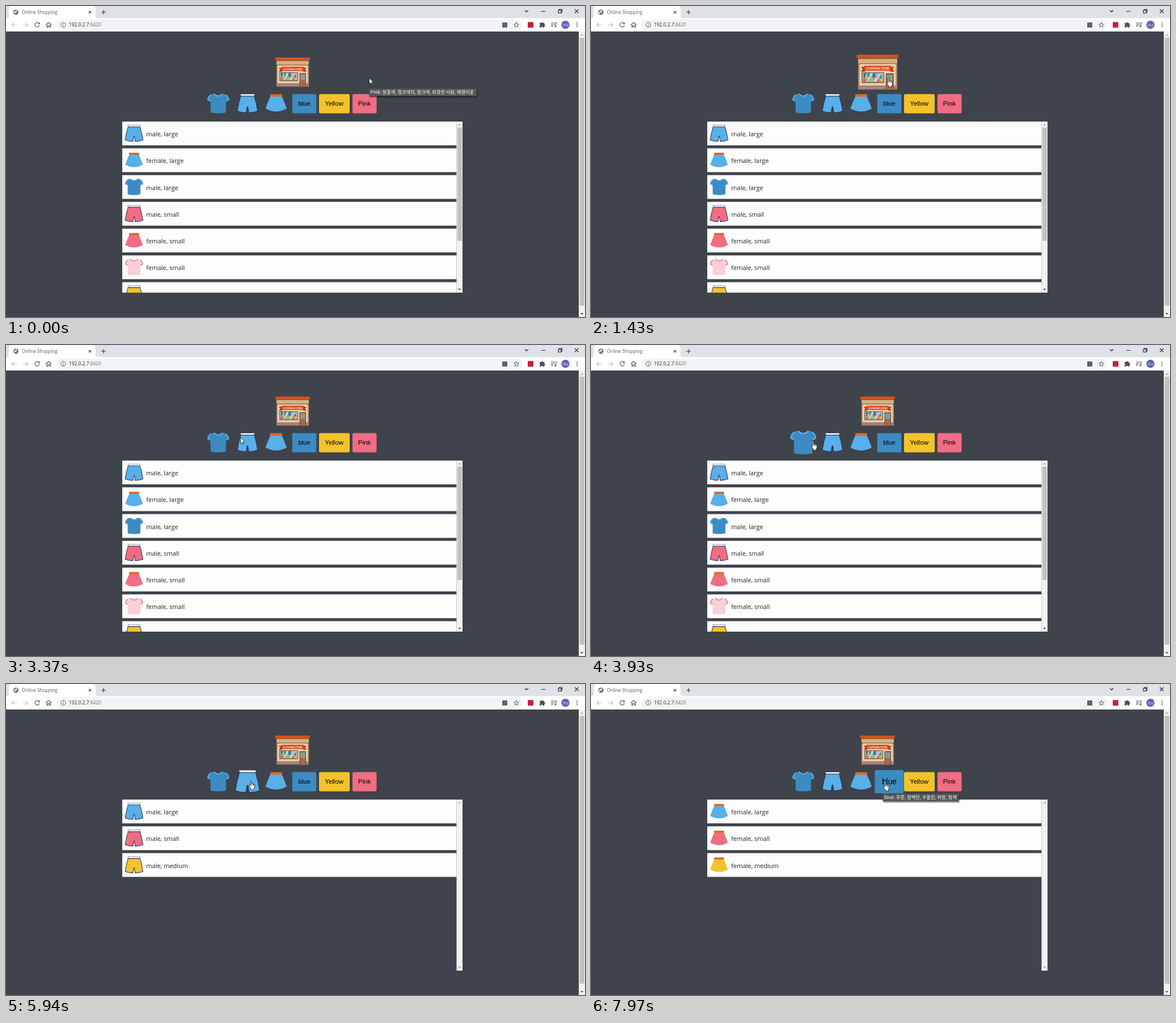
These frames come from a looping animation (1021x549 px, 8000 ms). An HTML page:

```html
<!DOCTYPE html>
<html lang="en">
<head>
<meta charset="utf-8">
<title>Online Shopping</title>
<style>
html, body { margin: 0; width: 100%; height: 100%; overflow: hidden; background: #3f444c; }
svg { display: block; width: 100vw; height: 100vh; }
text { font-family: "Open Sans", "Noto Sans", sans-serif; }
.line { fill: none; stroke: #4d5156; stroke-width: 1.1; }
.off { stroke: #babcbe; }
.button text { font: 11.5px "Liberation Sans", Arial, sans-serif; text-anchor: middle; }
.row text { font-size: 11px; fill: #222; }
.tip { filter: drop-shadow(1px 2px 1px #0008); }
.tip text { font: 8.2px "Noto Sans CJK KR", "Noto Sans CJK", sans-serif; fill: #fff; }
</style>
</head>
<body>
<svg viewBox="0 0 1021 549" preserveAspectRatio="none">
  <defs>
    <clipPath id="listArea"><rect x="205" y="204" width="600" height="302"/></clipPath>
    <g id="shirt">
      <path fill="currentColor" d="M-8-17.3Q0-10 8-17.3L13-15.8Q17.5-14 19.4-6L13.7-3.3 13.4 16Q0 19-13.4 16L-13.7-3.3-19.4-6Q-17.5-14-13-15.8Z"/>
      <path fill="none" stroke="var(--trim)" stroke-width="1.8" d="M-7.6-16.8Q0-9.3 7.6-16.8M-18.6-6.4L-13.8-4.2M18.6-6.4L13.8-4.2M-18.4-7Q-16.6-13.6-13-15M18.4-7Q16.6-13.6 13-15"/>
    </g>
    <g id="shorts" stroke="#29345a" stroke-width="1.2" stroke-linejoin="round">
      <path fill="currentColor" d="M-12-13H12Q16 0 18 13.5 11 16.5 2.2 16.3L.6 6H-.6L-2.2 16.3Q-11 16.5-18 13.5-16 0-12-13Z"/>
      <path fill="#fff" stroke-width=".6" d="M-12.5-16.6H12.5L12-12.8H-12Z"/>
      <path fill="none" stroke-width="1.5" stroke-dasharray="1.5 1.5" d="M-12-13.2H12"/>
    </g>
    <g id="skirt">
      <path fill="currentColor" d="M-10-12H10Q15-1 18.7 9.7 0 20.6-18.7 9.7-15-1-10-12Z"/>
      <rect x="-10.5" y="-15.6" width="21" height="4.3" fill="#e4661b"/>
    </g>
  </defs>

  <rect width="1021" height="549" fill="#3f444c"/>

  <!-- browser window -->
  <rect width="1021" height="22" fill="#dee1e6"/>
  <rect y="21.5" width="1021" height="23.5" fill="#fff"/>
  <path fill="#fff" d="M0 22Q5 22 5 17V6Q5 0 11 0H152Q158 0 158 6V17Q158 22 163 22Z"/>
  <circle cx="17.5" cy="11" r="4.6" fill="#5f6368"/>
  <path fill="#fff" d="M14 10Q17 10 17 8L19 7.5Q20 10 18 11L16 12Q17 14 15.5 14.2 13.7 12 14 10ZM19 12L21 11.5 19.5 14Z"/>
  <text x="28" y="14" font-size="8.1" fill="#55595e">Online Shopping</text>
  <g class="line">
    <path d="M145.8 8.8L150.2 13.2M150.2 8.8L145.8 13.2M168.2 11H175.8M172 7.2V14.8" stroke="#333"/>
    <path d="M915 7.5L918 10.5 921 7.5M944 9.5H951M1003 6L1009.5 12.5M1009.5 6L1003 12.5" stroke="#222"/>
    <path d="M974 7.5H979V12.5H974ZM975.5 7V6H980.5V11H979.5" stroke="#222"/>
    <path class="off" d="M18.5 33.3H10.5M14 29.5L10 33.3 14 37.1M30 33.3H38M34.5 29.5L38.5 33.3 34.5 37.1"/>
    <path d="M58.3 30.7A4 4 0 1 0 59 34.2"/>
    <path d="M59.5 28.8V32.2H56Z" fill="#4d5156" stroke="none"/>
    <path d="M70.5 33L75.2 29 80 33M72 32V37.5H74V34.5H76.5V37.5H78.5V32"/>
  </g>
  <rect x="89" y="24" width="822" height="18" rx="9" fill="#f1f3f4"/>
  <g class="line">
    <circle cx="101" cy="33.2" r="4.2" stroke-width=".9"/>
    <path d="M101 32.7V35.6M101 30.6V31.6" stroke-width=".9"/>
    <path d="M900 29L901.2 32 904.3 32.2 901.9 34.2 902.7 37.3 900 35.6 897.3 37.3 898.1 34.2 895.7 32.2 898.8 32Z" stroke-width=".9"/>
    <path d="M961 30H968M961 32.7H968M961 35.4H965M969.7 35.5V30H972"/>
  </g>
  <text x="111" y="36.4" font-size="8.4" fill="#26282b">192.0.2.7<tspan fill="#6f7378">:8420</tspan></text>
  <rect x="875" y="29" width="9" height="9" fill="#5f6368"/>
  <rect x="920" y="28.3" width="10" height="10" rx="1" fill="#c8203c"/>
  <path fill="#4d5156" d="M941 30H944A1.5 1.5 0 0 1 947 30H949.3V32.5A1.5 1.5 0 0 1 949.3 35.5V38H946.5A1.4 1.4 0 0 0 943.6 38H941V35A1.4 1.4 0 0 0 941 32.4Z"/>
  <circle cx="968.8" cy="36.2" r="1.4" fill="#4d5156"/>
  <circle cx="986.5" cy="33.2" r="7.2" fill="#5862b4"/>
  <text x="986.5" y="35.6" font-size="6" fill="#fff" text-anchor="middle" style="font-family:'Noto Sans CJK KR',sans-serif">가나</text>
  <path stroke="#4d5156" stroke-width="2" stroke-linecap="round" d="M1007 30h0M1007 33.3h0M1007 36.6h0"/>

  <!-- page scrollbar -->
  <rect x="1010" y="45" width="11" height="504" fill="#f1f1f1"/>
  <rect x="1011.5" y="56" width="8.5" height="473" fill="#c1c1c1"/>
  <path fill="#a3a3a3" d="M1013 52.5H1018L1015.5 49.5Z"/>
  <path fill="#505050" d="M1013 542H1018L1015.5 545Z"/>

  <!-- list -->
  <g clip-path="url(#listArea)">
    <g id="rows"></g>
    <rect x="794.5" y="204" width="10.5" height="302" fill="#f1f1f1"/>
    <rect id="thumb" x="796" y="214.5" width="8" height="200" fill="#c1c1c1"/>
    <path fill="#a3a3a3" d="M797.3 211H802.3L799.8 208Z"/>
    <path id="down" d="M797.3 499H802.3L799.8 502Z"/>
  </g>

  <!-- hover targets -->
  <g id="store">
    <rect x="477" y="96" width="57" height="46" fill="#f0d2a6"/>
    <path stroke="#8c5f4a" stroke-width="2" stroke-dasharray="2 1.5" d="M478 105V137M533 105V137"/>
    <path stroke="#d9b88d" stroke-width=".6" d="M480 107H531M480 110.5H531M480 114H531M480 134H531"/>
    <rect x="477" y="96" width="57" height="8" fill="#d5b083"/>
    <path stroke="#7a4a3c" d="M476.5 96.6H534.5M476.5 104.2H534.5"/>
    <rect x="474.8" y="91" width="61" height="5" fill="#d4511b"/>
    <path fill="#b53d1b" d="M481 109H487V116H481L483.5 112.5ZM530 109H524V116H530L527.5 112.5Z"/>
    <rect x="485.5" y="107.4" width="40" height="7.2" fill="#d9481f"/>
    <text x="505.5" y="112.6" font-size="4" font-weight="700" fill="#fff" text-anchor="middle">CLOTHING STORE</text>
    <rect x="477" y="137" width="57" height="5.3" fill="#a98580"/>
    <path stroke="#7d5c58" stroke-width=".8" d="M477 137H534M477 142H534"/>
    <rect x="482" y="117" width="33" height="15.5" fill="#70594f"/>
    <rect x="483" y="118" width="31" height="13" fill="#8fb4c2"/>
    <path fill="#3f7482" d="M485 118H488V126H485ZM491 118H493V124H491ZM498 118H502V125H498ZM508 118H511V126H508Z"/>
    <path fill="#d95e91" d="M484 127H491V131H484ZM504 122H508V131H504Z"/>
    <path fill="#91c53c" d="M491 124H495V130H491ZM498 126H503V131H498Z"/>
    <path fill="#e4b53c" d="M487 122H490V127H487ZM509 126H513V131H509Z"/>
    <path fill="#fff" opacity=".5" d="M496 118H499L491 131H488ZM508 118H513L503 131H499Z"/>
    <rect x="517.5" y="118.5" width="11.5" height="24" fill="#714b40"/>
    <rect x="518.5" y="119.5" width="9.5" height="23" fill="#a6684f"/>
    <path fill="#79aab4" d="M519.5 121H522.8V130.5H519.5ZM523.7 121H527V130.5H523.7Z"/>
  </g>
  <g id="shirtPick" color="#3d8bc3" style="--trim:#5fb2e8"><use href="#shirt" x="374.3" y="172"/></g>
  <g id="shortsPick" color="#58afe9"><use href="#shorts" x="425.8" y="172"/></g>
  <g id="skirtPick" color="#58afe9"><use href="#skirt" x="476.3" y="171.2"/></g>
  <g class="button"><rect x="552" y="155.5" width="54" height="34" rx="2.5" fill="#f4c22b"/><text x="578.7" y="176.3">Yellow</text></g>
  <g class="button"><rect x="611" y="155.5" width="42.5" height="34" rx="2.5" fill="#f06d83"/><text x="632" y="176.3">Pink</text></g>
  <g class="button" id="bluePick"><rect x="504.7" y="155.5" width="42.5" height="34" rx="2.5" fill="#3d8bc3"/><text x="526" y="176.3">blue</text></g>

  <g class="tip" id="pinkTip"><rect x="640" y="146" width="190" height="13" fill="#555759"/><text x="642.5" y="155.4">Pink: 분홍색, 핑크색의, 핑크색, 좌경한 사람, 패랭이꽃</text></g>
  <g class="tip" id="blueTip"><rect x="514.5" y="194" width="134" height="13" fill="#555759"/><text x="517" y="203.4">blue: 푸른, 창백한, 우울한, 파랑, 청색</text></g>

  <g id="cursor" fill="#fff" stroke="#111" stroke-width=".8" stroke-linejoin="round">
    <path id="arrow" d="M0 0V10.6L2.5 8.4 4.1 12 5.7 11.3 4.1 7.8H7.4Z"/>
    <path id="hand" d="M-.9 1.2Q-.9.2.1.2 1.1.2 1.1 1.2V5.8Q2.8 4.6 3.4 6.2 4.8 5.5 5.2 6.9 6.7 6.5 7 8.2V12L5.7 14.6V16.8H.6V15L-2.8 10.5Q-3.4 9.2-2.4 8.7L-.9 10.2ZM1.1 5.8V9M3.4 6.2V9M5.2 6.9V9.4"/>
  </g>
</svg>
<script>
const LOOP = 8000;
const $ = id => document.getElementById(id);
const show = (id, on) => $(id).setAttribute("visibility", on ? "visible" : "hidden");

const colors = { blue: "#58afe9", pink: "#f06d83", yellow: "#f4c22b" };
const shirtColors = { blue: ["#3d8bc3", "#5fb2e8"], pink: ["#f9cfd8", "#ee7187"], yellow: ["#fade00", "#f7d416"] };
const iconScale = { shirt: .83, shorts: .87, skirt: .83 };
const items = [
  ["shorts", "blue", "male, large"], ["skirt", "blue", "female, large"], ["shirt", "blue", "male, large"],
  ["shorts", "pink", "male, small"], ["skirt", "pink", "female, small"], ["shirt", "pink", "female, small"],
  ["shorts", "yellow", "male, medium"], ["skirt", "yellow", "female, medium"], ["shirt", "yellow", "female, medium"]
];

// id, scale centre, pointer enters, pointer leaves
const targets = [
  ["store", 505.5, 116.5, 950, 3050],
  ["shirtPick", 374.3, 172, 3450, 4880],
  ["shortsPick", 425.8, 172, 4890, 6380],
  ["skirtPick", 476.3, 171.2, 6420, 7560],
  ["bluePick", 526, 172.5, 7640, 9000]
];

// time, x, y of the pointer tip
const path = [
  [0, 640.5, 127], [250, 640.5, 127], [950, 540, 129], [1430, 524.5, 126], [2670, 508.5, 123],
  [2900, 507, 126], [3050, 494, 148], [3450, 394, 167], [3930, 391.5, 169], [4750, 391.5, 170],
  [4885, 405, 171], [5040, 430, 170], [6200, 432, 170], [6380, 446, 169], [6420, 456, 169],
  [6740, 473, 168], [7300, 474, 168], [7560, 497, 170], [7640, 503, 171], [7800, 518.5, 172], [LOOP, 518.5, 172]
];

const ease = p => 1 - (1 - Math.min(1, Math.max(0, p))) ** 2.4;
const filterAt = t => t < 4500 ? "all" : t < 5500 ? "shirt" : t < 7100 ? "shorts" : "skirt";

function row([kind, color, label], i) {
  const y = 204 + i * 47.25;
  const [fill, trim] = kind === "shirt" ? shirtColors[color] : [colors[color], ""];
  return `<g class="row" transform="translate(205 ${y})"><rect width="589.5" height="42" fill="#fdfdfd"/>
    <use href="#${kind}" color="${fill}" style="--trim:${trim}" transform="translate(20.8 20.7) scale(${iconScale[kind]})"/>
    <text x="42.3" y="26">${label}</text></g>`;
}

let shown;
function drawList(filter) {
  if (filter === shown) return;
  shown = filter;
  const all = filter === "all";
  $("rows").innerHTML = items.filter(item => all || item[0] === filter).map(row).join("");
  show("thumb", all);
  $("down").setAttribute("fill", all ? "#505050" : "#a3a3a3");
}

function pointer(t) {
  const i = path.findIndex(key => key[0] > t);
  const [t0, x0, y0] = path[i - 1], [t1, x1, y1] = path[i];
  const p = (t - t0) / (t1 - t0);
  return [x0 + (x1 - x0) * p, y0 + (y1 - y0) * p];
}

function draw(now) {
  const t = now % LOOP;
  drawList(filterAt(t));
  let over = false;
  for (const [id, x, y, enter, leave] of targets) {
    const s = 1 + .2 * ease((t - enter) / 300) * (1 - ease((t - leave) / 300));
    $(id).setAttribute("transform", `translate(${x} ${y}) scale(${s}) translate(${-x} ${-y})`);
    over ||= t >= enter && t < leave;
  }
  $("cursor").setAttribute("transform", `translate(${pointer(t)})`);
  show("hand", over);
  show("arrow", !over);
  show("pinkTip", t < 300);
  show("blueTip", t >= 7900);
}

const start = performance.now();
function tick() {
  draw(performance.now() - start);
  requestAnimationFrame(tick);
}
tick();
</script>
</body>
</html>
```
